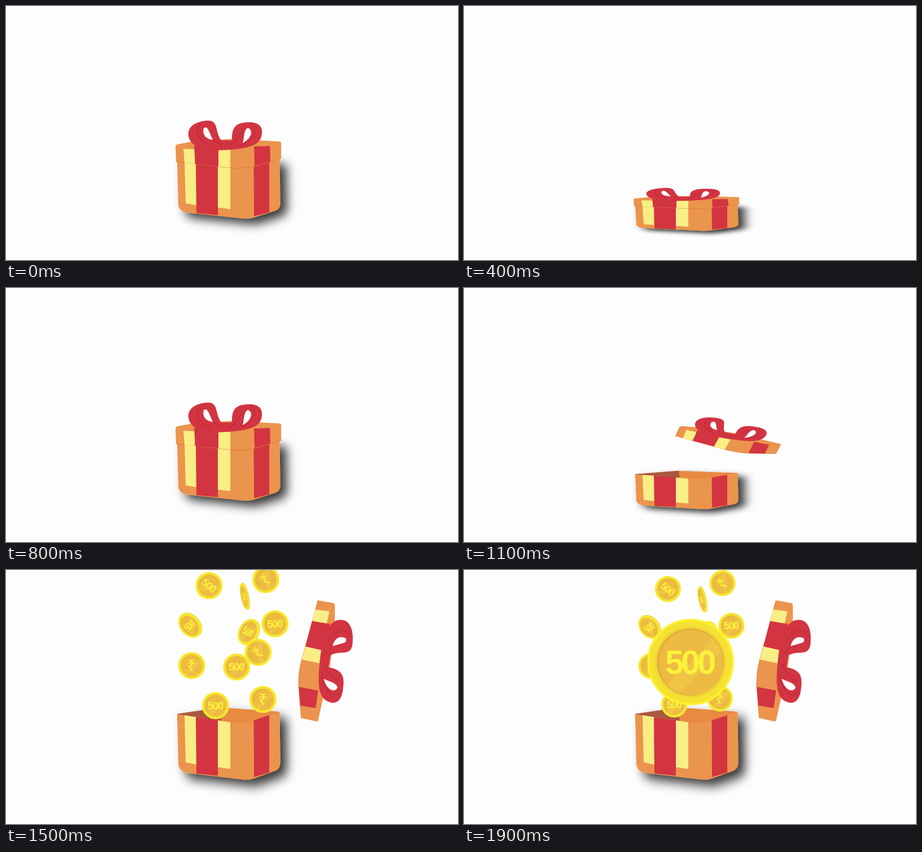
Animation of 800 by 450 pixels, one loop 2 s. Source, as an HTML page:

```html
<!DOCTYPE html>
<html lang="en">
<head>
<meta charset="utf-8">
<title>Gift box</title>
<style>
  html, body { margin: 0; width: 100%; height: 100%; overflow: hidden; background: #fdfdfd; }
  svg { display: block; width: 100vw; height: 100vh; }
  .orange { fill: #eb944e; }
  .red { fill: #d23441; }
  .yellow { fill: #f9ee86; }
  .hole { fill: #fdfdfd; }
  .crease { fill: none; stroke: #b92c3b; stroke-width: 1.3; }
  .coin text { fill: #fcf23a; text-anchor: middle; font-family: "Liberation Sans", "Noto Sans", sans-serif; }
  .value { font-size: 15.5px; font-weight: bold; letter-spacing: -1.2px; }
  .rupee { font-size: 23px; }
</style>
</head>
<body>
<svg viewBox="0 0 800 450">
  <defs>
    <filter id="shadow" x="-20%" y="-25%" width="150%" height="180%">
      <feDropShadow dx="12" dy="10" stdDeviation="9" flood-color="#000" flood-opacity=".78"/>
    </filter>
    <g id="disc">
      <circle r="19.5" fill="#f4e233" stroke="#fdf22c"/>
      <circle r="16.6" fill="#f2d735"/>
      <circle r="15.6" fill="#e3b03b"/>
      <circle cx=".4" cy=".3" r="15" fill="#edbb41"/>
      <path d="M10.600 -10.600L-10.600 10.600A15 15 0 0 0 -5 14.200L14.200 -5Z" fill="#f0c546"/>
    </g>
  </defs>

  <g id="gift">
    <g filter="url(#shadow)">
      <path fill="#e98a42" d="M303 274L380 264L484 270.500L440 296L303 285Z"/>
      <path fill="#a9593f" d="M303 274L380 264L382 290L303 285Z"/>
      <path class="orange" d="M303 274.500L396 287Q418 290 439 284L484.500 271L485.500 351Q485 360 476 363L440 374.500Q430 378 415 376L320 366Q306 363 305 352Z"/>
      <path class="yellow" d="M316 276L337 279V353L318 349.500ZM374 284L397 287V360L375 357Z"/>
      <path class="red" d="M336 279L375 284V370.500L337 367ZM438.500 284L466 276V365.500L439 372.500Z"/>
    </g>
    <g id="lid">
      <path class="orange" d="M300 249Q300 246 304 245L335 239L400 235.500L484 240Q487 240 487 243V270L441 283.500Q420 289 397 286.500L301 276Z"/>
      <path fill="none" stroke="#e27f3a" d="M301 276L397 286.500Q420 289 441 283.500L487 270"/>
      <path class="yellow" d="M314 253L334 254V280L316 278ZM375 256L397 255V286.500L375 284Z"/>
      <path class="red" d="M333 248H376V284L335 280ZM439 249L467 248L468 275.500L440 283.500Z"/>
      <path class="red" d="M386 255C362 256 336 253 327 240C317 224 324 205 357 203C377 203 369 222 381 238H400C399 211 410 206 432 206C448 206 454 215 453 225C452 244 436 253 386 255Z"/>
      <path class="hole" d="M350 216C347 228 354 236 366 237C362 229 358 216 354 215ZM428 216C437 219 437 233 419 243C422 234 420 220 428 216Z"/>
      <path class="crease" d="M346 209C331 218 340 240 364 247M366 237L382 247M433 210C448 216 440 240 410 248M420 216Q408 240 396 247"/>
    </g>
  </g>
  <g id="coins"></g>
  <g id="bigCoin" class="coin"></g>
</svg>
<script>
const LOOP = 2000, STEP = 100, FLOOR = 415;
const el = id => document.getElementById(id);
const place = (id, transform) => el(id).setAttribute('transform', transform);

const face = label => label === '₹'
  ? '<use href="#disc"/><text class="rupee" y="8">₹</text>'
  : '<use href="#disc"/><text class="value" x="-.6" y="5.500">500</text>';

function coin(label, x, y, turn, width) {
  const edge = width < 1
    ? `<ellipse cx="2" rx="${20 * width}" ry="20" fill="#f5e52a" stroke="#d9bd2b" stroke-dasharray="1 1.500"/>` : '';
  return `<g class="coin" transform="translate(${x} ${y}) rotate(${turn})">
    ${edge}<g transform="scale(${width} 1)">${face(label)}</g></g>`;
}

// Three strands of coins, each listed from the top down
const left = ['500', '500', '₹', '500'].map((label, i) =>
  coin(label, 335 + 16 * (i - 1.4) ** 2, 41 + 59 * i, i < 2 ? 40 * (-1) ** i : 0, i === 1 ? .7 : 1));
const middle = ['', '500', '500'].map((label, i) =>
  coin(label, 418 + 17.5 * i - 11.5 * i * i, 57 + 52 * i, [-12, 26, 0][i], Math.min(1, .25 + .45 * i)));
const right = ['₹', '500', '₹', '₹'].map((label, i) =>
  coin(label, 450 + 15 * Math.sin(2 * i), 32 + 58 * i + 9 * Math.sin(2.2 * i), i % 2 ? 0 : -50, 1));
// The lowest coin on the right stands upright like its neighbour
el('coins').innerHTML = [...left, ...middle, ...right].join('');
el('bigCoin').innerHTML = face('500');

const progress = (t, from, to) => Math.min(1, Math.max(0, (t - from) / (to - from)));
const ease = (t, from, to) => (1 - Math.cos(Math.PI * progress(t, from, to))) / 2;
const show = (id, visible) => { el(id).style.display = visible ? '' : 'none'; };

function draw(t) {
  // Two squashes; the second one springs back taller
  const stretch = 1 - .563 * (ease(t, 0, 400) - ease(t, 400, 800))
    - .45 * ease(t, 800, 1035) + .585 * ease(t, 1035, 1365);
  place('gift', `translate(0 ${FLOOR}) scale(1 ${stretch}) translate(0 ${-FLOOR})`);

  const flight = progress(t, 930, 1300);
  const hop = -57 * flight - 58 * Math.sin(Math.PI * flight);
  place('lid', `translate(${166 * flight} ${hop}) rotate(${101 * flight ** 2.2} 394 250)`);

  const left = 1 - progress(t, 1140, 1500), settle = progress(t, 1500, 1900);
  const spread = 1.2 * (1 - left ** 3) - .045 * settle;
  place('coins', `translate(401 ${107 + 500 * left ** 9 + 3 * settle}) scale(${spread}) translate(-401 -107)`);
  show('coins', t >= 1200);

  place('bigCoin', `translate(${408 - 7 * settle} ${172 - 9 * settle}) scale(${1.2 + 2.63 * settle})`);
  show('bigCoin', t > 1500);
}

const start = performance.now();
function frame() {
  const t = (performance.now() - start) % LOOP;
  draw(Math.floor(t / STEP) * STEP);
  requestAnimationFrame(frame);
}
frame();
</script>
</body>
</html>
```
